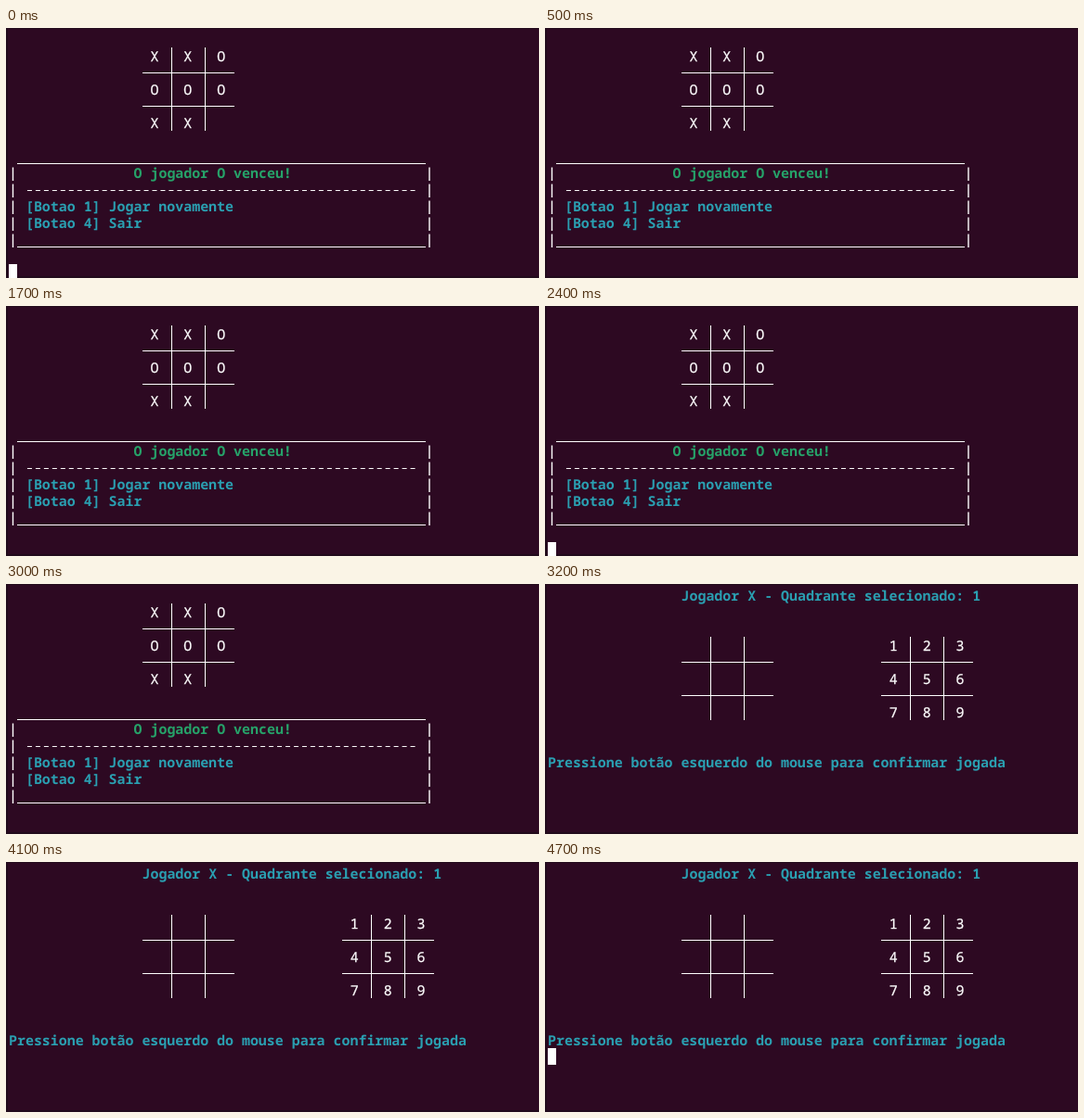
An HTML page for the animation above (5100 ms loop, 574 by 270 pixels).

```html
<!DOCTYPE html>
<html lang="pt">
<head>
<meta charset="utf-8">
<title>Jogo da velha</title>
<style>
html, body { margin: 0; width: 100%; height: 100%; overflow: hidden; background: #2d0922; }
svg { display: block; }
text {
  font: 500 14.95px "Noto Sans Mono", "DejaVu Sans Mono", monospace;
  fill: #fff; white-space: pre; text-rendering: geometricPrecision;
}
.plain { stroke: #fff; stroke-width: 0.25px; }
.cyan { fill: #2a9fb1; font-weight: bold; }
.green { fill: #26a269; font-weight: bold; }
.line { fill: #fff; }
</style>
</head>
<body>
<svg id="stage" width="574" height="270" viewBox="0 0 574 270">
  <rect width="574" height="270" fill="#2d0922"/>
  <path d="M0 0H574V1H2V268H574V270H0Z" fill="#210a1b"/>
  <g id="result"></g>
  <g id="turn"></g>
  <rect id="cursor" class="line" x="3" width="9" height="18"/>
</svg>
<script>
const LOOP = 5100, SWITCH = 3200, BLINK = 600;
const CELL_W = 8.97, CELL_H = 18, PAD = 3;
const byId = id => document.getElementById(id);
const colX = col => PAD + col * CELL_W;
const midX = col => colX(col + 0.5);
const rowY = row => PAD + row * CELL_H;

function add(parent, tag, attrs, content = "") {
  const el = document.createElementNS("http://www.w3.org/2000/svg", tag);
  for (const key in attrs) el.setAttribute(key, attrs[key]);
  el.textContent = content;
  parent.appendChild(el);
}

function write(parent, col, row, content, cls = "plain") {
  add(parent, "text", { x: colX(col), y: rowY(row) + 15, class: cls }, content);
}

// One-pixel rules sit on whole pixels.
function rule(parent, x, y, width, height) {
  add(parent, "rect", {
    x: Math.round(x), y, width: Math.round(width), height,
    class: "line", "shape-rendering": "crispEdges"
  });
}

function board(parent, col, row, marks) {
  for (const i of [0, 1]) {
    rule(parent, midX(col + 3 + 4 * i), rowY(row), 1, 5 * CELL_H);
    rule(parent, colX(col), rowY(row + 1 + 2 * i) + 9, 11 * CELL_W, 1);
  }
  [...marks].forEach((mark, i) => {
    if (mark !== " ") write(parent, col + 1 + 4 * (i % 3), row + 2 * Math.floor(i / 3), mark);
  });
}

function buildResult(g) {
  board(g, 16, 1, "XXOOOOXX ");
  for (const row of [7, 12]) rule(g, colX(1), rowY(row) + 17, 49 * CELL_W, 1);
  for (let row = 8; row <= 12; row++) {
    for (const col of [0, 50]) {
      add(g, "rect", { x: midX(col) - 0.7, y: rowY(row) + 3.5, width: 1.4, height: 14.5, class: "line" });
    }
  }
  add(g, "path", {
    d: `M${colX(2) + 2} ${rowY(9) + 10.5}H${colX(49)}`,
    stroke: "#fff", "stroke-dasharray": `5 ${CELL_W - 5}`
  });
  write(g, 15, 8, "O jogador O venceu!", "green");
  write(g, 2, 10, "[Botao 1] Jogar novamente", "cyan");
  write(g, 2, 11, "[Botao 4] Sair", "cyan");
}

function buildTurn(g) {
  write(g, 16, 0, "Jogador X - Quadrante selecionado: 1", "cyan");
  board(g, 16, 3, " ".repeat(9));
  board(g, 40, 3, "123456789");
  write(g, 0, 10, "Pressione botão esquerdo do mouse para confirmar jogada", "cyan");
}

const result = byId("result"), turn = byId("turn"), cursor = byId("cursor");
buildResult(result);
buildTurn(turn);

function draw(t) {
  const playing = t >= SWITCH;
  const lit = Math.floor((t + 100) / BLINK) % 2 === 0;
  result.style.display = playing ? "none" : "";
  turn.style.display = playing ? "" : "none";
  cursor.setAttribute("y", rowY(playing ? 11 : 14));
  cursor.style.display = lit ? "" : "none";
}

const start = performance.now();
function tick() {
  draw((performance.now() - start) % LOOP);
  requestAnimationFrame(tick);
}
tick();
</script>
</body>
</html>
```
